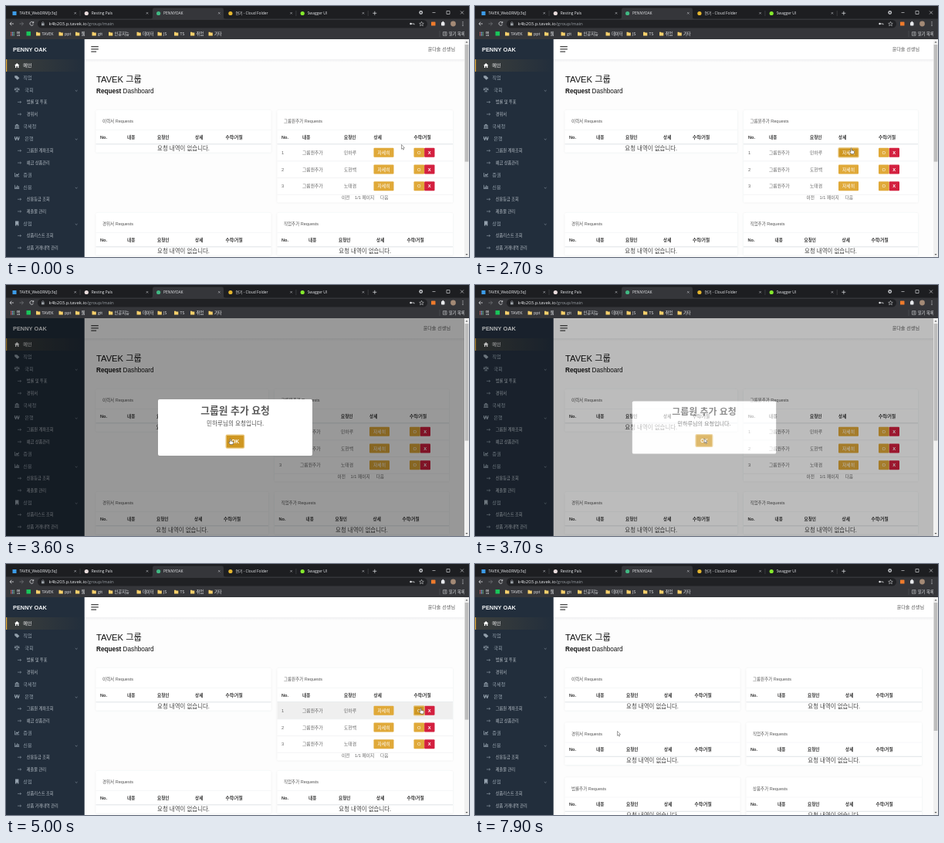
Animation, 600 px wide and 325 px high, one loop 8 s. Source, as an HTML page:

```html
<!DOCTYPE html>
<html lang="ko">
<head>
<meta charset="utf-8">
<title>Dashboard</title>
<style>
html, body { margin: 0; width: 100%; height: 100%; overflow: hidden; background: #fff; }
svg { display: block; width: 600px; height: 325px; }
text { font-family: "Liberation Sans", "Noto Sans CJK KR", "Noto Sans CJK", sans-serif; white-space: pre; }
#chrome text { font-family: "Open Sans", "Noto Sans CJK KR", "Noto Sans CJK", sans-serif; }
.cjk { font-family: "Noto Sans CJK KR", "Noto Sans CJK", sans-serif; }
</style>
</head>
<body>
<svg viewBox="0 0 600 325">
  <defs>
    <linearGradient id="active"><stop stop-color="#e0a83a" stop-opacity=".14"/><stop offset="1" stop-color="#e0a83a" stop-opacity="0"/></linearGradient>
    <linearGradient id="fade" x2="0" y2="1"><stop stop-color="#eff0f1"/><stop offset="1" stop-color="#fdfdfd"/></linearGradient>
    <filter id="soft" x="-5%" y="-10%" width="110%" height="120%"><feDropShadow dx="0" dy=".3" stdDeviation="1.3" flood-color="#455" flood-opacity=".09"/></filter>
  </defs>
  <g id="page"></g>
  <g id="side"></g>
  <g id="modal"></g>
  <g id="bar"></g>
  <g id="chrome"></g>
  <path id="arrow" d="M0 0V5.8L1.3 4.7 2.2 6.7 3.1 6.3 2.2 4.3H4Z" fill="#fff" stroke="#444" stroke-width=".5"/>
  <path id="hand" d="M0 .4Q.7-.4 1.2.4V3L4 3.6Q4.8 3.9 4.6 5L4 7.6H.6L-1.6 4.8Q-1.5 3.8-.6 4.3L0 4.8Z" fill="#fff" stroke="#333" stroke-width=".5"/>
</svg>
<script>
const $ = id => document.getElementById(id);
const GOLD = '#e0a939', RED = '#d3203f', DIM = '#93a0ac';

// y is the vertical middle of the text
const text = (x, y, s, size = 5.6, fill = '#555', more = '') =>
  `<text x="${x}" y="${y + size * .37}" font-size="${size}" fill="${fill}" ${more}>${s}</text>`;
const mid = 'text-anchor="middle"', bold = 'font-weight="bold"', cjk = 'class="cjk"';
const rect = (x, y, w, h, fill, r = 0, more = '') =>
  `<rect x="${x}" y="${y}" width="${w}" height="${h}" fill="${fill}" rx="${r}" ${more}/>`;
const dot = (x, y, r, fill) => `<circle cx="${x}" cy="${y}" r="${r}" fill="${fill}"/>`;
const line = (d, color, w = .7) => `<path d="${d}" fill="none" stroke="${color}" stroke-width="${w}"/>`;
const cross = (x, y, r, color) => line(`M${x - r} ${y - r}l${2 * r} ${2 * r}m0 ${-2 * r}l${-2 * r} ${2 * r}`, color, .6);

function chrome() {
  const light = '#e8eaed', grey = '#9aa0a6';
  let s = rect(0, 0, 600, 43, '#35363a') + rect(0, 0, 600, 16.5, '#1d1e21');
  s += '<path d="M187 17Q190 17 190 14V5Q190 2.5 192 2.5H280Q282 2.5 282 5V14Q282 17 285 17Z" fill="#35363a"/>';
  const tabs = [['TAVEK_WebDRM[z3q]', '#3c9be8'], ['Resting Pals', '#e9dcdc'], ['PENNYOAK', '#41b883'],
    ['연기 - Cloud Folder', '#e5b62f'], ['Swagger UI', '#85ea2d']];
  tabs.forEach(([name, color], i) => {
    const x = 11 + 93.3 * i;
    s += (i ? dot(x, 9.5, 2.6, color) : rect(8.5, 7, 5, 5, color));
    s += text(x + 6.5, 9.3, name, 4.9, light) + cross(x + 78.7, 9.3, 1.2, '#c4c7cb');
    if (i < 1 || i > 2) s += line(`M${x + 85} 6v7`, '#55585c', .5);
  });
  s += line('M475.3 9.3h5m-2.5-2.5v5', light) + dot(537.7, 8.5, 2.4, '#c4c7cb') + dot(537.7, 8.5, 1, '#1d1e21');
  s += line('M552.5 8.5h4M571 6.5h4v4h-4z', light, .6) + cross(591, 8.5, 2, light);

  s += rect(41, 18, 505, 10.5, '#202124', 5.2);
  s += line('M10 23H5m2.3-2.3L5 23l2.3 2.3', light);
  s += line('M17.5 23h5m-2.3-2.3L22.5 23l-2.3 2.3', '#777b80');
  s += line('M35.4 21.6A2.4 2.4 0 1 0 35.6 23.6M35.7 20v2h-2', light);
  s += rect(46, 22.3, 3.6, 3, grey) + line('M46.7 22.3v-1q1.1-1.6 2.2 0v1', grey);
  s += text(55.5, 22.8, `k4b203.p.tavek.io<tspan fill="${grey}">/group/main</tspan>`, 6, light);
  s += dot(511.5 + 13, 23, 1.2, light) + line('M525 23h4v1.3', light);
  s += '<path d="M538.5 20.3l.8 1.9 2 .2-1.5 1.3.5 2-1.8-1.1-1.8 1.1.5-2-1.5-1.3 2-.2z" fill="none" stroke="#e8eaed" stroke-width=".5"/>';
  s += rect(551, 20.5, 5.5, 5, '#ee7b2c', .6) + rect(564, 21, 4.5, 4.5, light, 1) + dot(566.3, 20.8, 1, light);
  s += dot(579.5, 23, 3.4, '#a48a76') + [20.8, 23, 25.2].map(y => dot(592, y, .6, light)).join('');

  for (let i = 0; i < 9; i++) s += rect(6 + i % 3 * 1.8, 33.7 + (i / 3 | 0) * 1.8, 1.2, 1.2, ['#e66', '#8ab4f8', '#7c9'][i % 3]);
  s += text(13.5, 36, '앱', 5.3, light) + rect(26.5, 33, 5.5, 5.5, '#19c45a');
  [[46.5, 'TAVEK'], [76, 'ppt'], [97.5, '웹'], [119, 'git'], [140.5, '인공지능'], [177, '데이터'],
    [204, 'JS'], [225.5, 'TS'], [246.5, '취업'], [270, '기타']].forEach(([x, name]) => {
    s += `<path d="M${x - 7.5} 33.7h2l.7.8h2.6v4h-5.3z" fill="#f5cf6b"/>` + text(x, 36, name, 5.3, light);
  });
  s += line('M562 32v8', '#5b5e62', .5) + line('M566.5 33.7h4.5v4.6h-4.5zM568 35h2m-2 1.6h2', light, .5);
  return s + text(574, 36, '읽기 목록', 5.2, light);
}

const icons = [
  'M-3.2 0L0-3 3.2 0H2.2V3H.8V1H-.8V3H-2.2V0Z',
  'M-3-2.6H0L3.2.5.6 3-3-.2Z',
  'M-.4-3H.4V2H2V2.8H-2V2H-.4ZM-3.2-2H3.2V-1.4H-3.2ZM-3.6.6L-2.2-1.6-.9.6ZM.9.6L2.2-1.6 3.6.6Z',
  'M-3-1L0-3 3-1ZM-2.4-.6h1V1.8h-1ZM-.5-.6h1V1.8h-1ZM1.4-.6h1V1.8h-1ZM-3 2.2H3V3H-3Z',
  'M-3.4-2.4h1L-1.6 1-.5-2.4H.5L1.6 1 2.4-2.4h1L2.2 2.6H1.1L0-.8-1.1 2.6H-2.2ZM-3.6-.4H3.6V.2H-3.6Z',
  'M-3-2.5h.7V2H3V2.7H-3ZM-1.8 1L-.4-1.2.8 0 2.6-2.2V-.6L.8 1.4-.4.4-1 1.5Z',
  'M-3-2.5h.7V2H3V2.7H-3ZM-1.6-.4h1v2h-1ZM0-2h1V1.6H0ZM1.6-1h1V1.6h-1Z',
  'M-2.2-3H2.2V3H.6V1.4H-.6V3H-2.2Z'];

function sidebar() {
  let s = rect(0, 43, 101.7, 282, '#222e3c') + rect(0, 69, 101.7, 16, 'url(#active)') + rect(0, 69, 1.2, 16, GOLD);
  s += text(9, 56, 'PENNY OAK', 7.4, '#f4f6f8', bold);
  // a leading dash marks a sub item, a trailing plus an open group
  const items = ['메인', '직업', '국회+', '-법률 및 투표', '-경위서', '국세청', '은행+', '-그룹원 계좌조회', '-예금 상품관리',
    '증권', '신용+', '-신용등급 조회', '-제출물 관리', '상점+', '-상품리스트 조회', '-상품 거래내역 관리'];
  let icon = 0;
  items.forEach((item, i) => {
    const y = 77 + i * 15.73, name = item.replace(/[-+]/, '');
    if (item[0] == '-') {
      s += line(`M15 ${y + .2}h4.6m-1.5-1.3l1.5 1.3-1.5 1.3`, DIM, .6) + text(26.8, y, name, 5.2, '#b9c1c9');
      return;
    }
    const color = i ? DIM : '#fff';
    const x = name == '국회' || name == '은행' ? 24.3 : 22.3;
    s += `<path transform="translate(14.2 ${y})" d="${icons[icon++]}" fill="${color}"/>` + text(x, y, name, 6.2, color);
    if (item.endsWith('+')) s += line(`M89.8 ${y + .6}l1.4 1.3 1.4-1.3`, DIM, .6);
  });
  return s;
}

const people = ['민하루', '도현백', '노태겸'];
const heads = ['No.', '내용', '요청인', '상세', '수락/거절'];
const ROW = 21.75;

function button(x, y, w, label, fill, ring) {
  const edge = ring ? 'stroke="#e8c67c" stroke-width="1.2"' : '';
  return rect(x, y - 6, w, 12, fill, 1, edge) + text(x + w / 2, y, label, 5.8, '#fff', mid);
}

function card(x, y, w, title, cols, rows, st) {
  const n = rows.length;
  let s = rect(x, y, w, n ? 54 + ROW * n : 54.5, '#fff', 1.5, 'filter="url(#soft)"');
  s += text(x + 8.5, y + 14, title + ' Requests', 5.5, '#555');
  s += line(`M${x} ${y + 25.5}h${w}`, '#eceef0', .5) + line(`M${x} ${y + 43.8}h${w}`, '#d9dce0', .8);
  heads.forEach((h, i) => s += text(x + cols[i], y + 34.5, h, 5.6, '#333', bold));
  if (!n) return s + text(x + w / 2, y + 49, '요청 내역이 없습니다.', 7.45, '#444', mid + ' ' + cjk);
  rows.forEach((name, i) => {
    const ry = y + 54.8 + i * ROW;
    if (st.hover == i) s += rect(x, ry - 10.8, w, ROW, '#efefef');
    s += line(`M${x} ${ry + 11}h${w}`, '#e6e8eb', .5);
    [i + 1, '그룹원추가', name].forEach((v, c) => s += text(x + cols[c], ry, v, 5.8, '#666'));
    const more = !i && st.more, ok = !i && st.ok;
    s += button(x + cols[3], ry, 26, '자세히', more ? '#cf9722' : GOLD, more);
    s += button(x + cols[4] + 13.6, ry, 13.4, '<tspan font-weight="bold">X</tspan>', RED);
    s += button(x + cols[4], ry, 13.6, 'O', ok ? '#cf9722' : GOLD, ok);
  });
  const py = y + 112.5 - ROW * (3 - n);
  [[83.5, '이전'], [100.5, '1/1 페이지'], [133.5, '다음']].forEach(([dx, v]) => s += text(x + dx - (st.narrow ? 2 : 0), py, v, 5.7, '#666'));
  return s;
}

function page(st) {
  const k = st.narrow, w = k ? 223.5 : 227, rx = k ? 348 : 351.5, rw = k ? 226 : 227.5;
  const plain = k ? [5.5, 40.5, 78.5, 127.5, 165.5] : [5.5, 40.5, 79.5, 128.5, 168];
  const full = k ? [6, 33, 86, 123, 175] : [5.5, 32.5, 86.5, 125, 177];
  let s = rect(101, 43, 493, 282, '#fdfdfd') + rect(101, 43, 493, 26, '#fff') + rect(101, 69, 493, 4, 'url(#fade)');
  s += line('M110.3 52.7h9.5m-9.5 3.2h9.5m-9.5 3.2h6.8', '#444', 1.2);
  s += text(k ? 576 : 582, 55.8, '윤다솔 선생님', 6.1, '#555', 'text-anchor="end"');
  s += text(117, 95, 'TAVEK 그룹', 11.2, '#111');
  s += text(117, 109.7, '<tspan font-weight="bold">Request</tspan> Dashboard', 8.2, '#111');
  const rows = people.slice(3 - st.n);
  const y2 = 135 + (st.n ? 67.75 + ROW * st.n : 70.5);
  const put = (y, a, b, r) => card(116.5, y, w, a, plain, [], st) + card(rx, y, rw, b, r.length ? full : plain, r, st);
  return s + put(135, '이력서', '그룹원추가', rows) + put(y2, '경위서', '직업추가', []) + put(y2 + 71, '법률추가', '상품추가', []);
}

function scrollbar(n) {
  const content = 437 + ROW * Math.max(n, 1);
  return rect(594, 43, 6, 282, '#f1f1f1') + rect(594.6, 50, 4.8, 270 * 282 / content, '#bdbdbd')
    + '<path d="M595.5 47.5L597 45.8 598.5 47.5ZM595.5 321L597 322.7 598.5 321Z" fill="#555"/>';
}

function modal() {
  return rect(0, 43, 594, 282, '#000', 0, 'opacity=".4"') + '<g id="box">' + rect(197, 148, 200, 73, '#fff', 2)
    + text(297, 161.8, '그룹원 추가 요청', 12.8, '#595959', `${mid} ${bold} ${cjk}`)
    + text(297, 179.3, people[0] + '님의 요청입니다.', 7.6, '#545454', `${mid} ${cjk}`)
    + rect(285.2, 194.3, 23.4, 16.8, '#cf9722', 1.5, 'stroke="#e8c67c" stroke-width="1.4"')
    + text(297, 202.6, 'OK', 6.8, '#fff', `${mid} ${bold}`) + '</g>';
}

// time, x, y of the pointer tip
const path = [[0, 512.5, 179.5], [900, 514, 66], [1200, 513.5, 62.5], [2000, 504, 122], [2600, 487, 184], [2800, 487, 184],
  [3500, 290, 199], [3650, 290, 199], [3800, 316.7, 198], [4700, 537, 186.5], [6900, 537, 186.5], [7000, 520, 180],
  [7400, 330, 105], [7900, 184.5, 216.5], [8000, 184.5, 216.5]];

function pointer(t) {
  const i = path.findIndex(p => p[0] > t), [t0, x0, y0] = path[i - 1], [t1, x1, y1] = path[i];
  const u = (t - t0) / (t1 - t0), e = u * u * (3 - 2 * u);
  return [x0 + (x1 - x0) * e, y0 + (y1 - y0) * e];
}

const clamp = v => Math.max(0, Math.min(1, v));
$('chrome').innerHTML = chrome();
$('side').innerHTML = sidebar();
$('modal').innerHTML = modal();
let last;

function draw() {
  const t = performance.now() % 8000, [x, y] = pointer(t);
  const narrow = t >= 2700 && t < 3900;
  const n = t < 5200 ? 3 : t < 5900 ? 2 : t < 6900 ? 1 : 0;
  const row = Math.floor((y - 180) / ROW);
  const inside = (a, b) => x > a && x < b && row == 0;
  const hover = !narrow && x > 351 && x < 579 && row >= 0 && row < n ? row : -1;
  const more = n > 0 && t < 2900 && inside(476, 502);
  const ok = n > 0 && t > 4000 && inside(528, 542);
  const st = { narrow, n, hover, more, ok }, key = JSON.stringify(st);
  if (key != last) {
    $('page').innerHTML = page(st);
    $('bar').innerHTML = scrollbar(n);
    last = key;
  }
  const show = clamp((t - 2750) / 150) * clamp((3780 - t) / 120);
  $('modal').setAttribute('opacity', show);
  const scale = .8 + .2 * show;
  $('box').setAttribute('transform', `translate(297 184.5) scale(${scale}) translate(-297 -184.5)`);
  const hand = more || ok || (t > 3450 && t < 3700);
  for (const id of ['hand', 'arrow']) {
    $(id).setAttribute('transform', `translate(${x} ${y})`);
    $(id).style.display = (id == 'hand') == hand ? '' : 'none';
  }
  requestAnimationFrame(draw);
}
draw();
</script>
</body>
</html>
```
